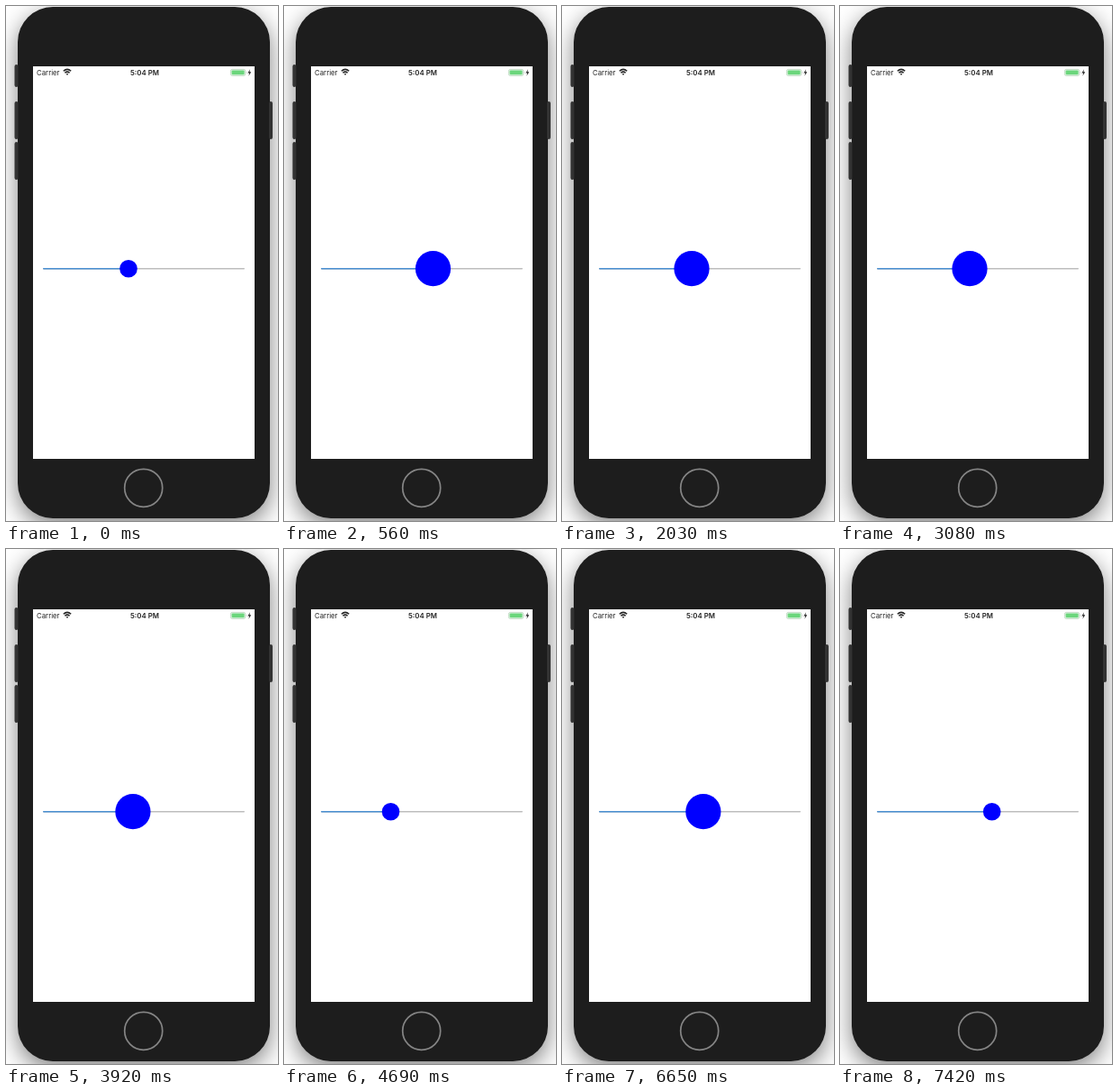
Recreate the animation shown at these times as an HTML page. Size 302 px wide and 572 px high, loop 7.7 s.

```html
<!DOCTYPE html>
<html lang="en">
<head>
<meta charset="utf-8">
<title>Slider thumb</title>
<style>
  html, body { margin: 0; width: 100%; height: 100%; overflow: hidden; background: #fff; }
  svg { display: block; width: 302px; height: 572px; }
  text { font-family: Inter, "Liberation Sans", sans-serif; fill: #222; }
  .soft { filter: blur(.4px); }
  .body { fill: #1d1d1d; filter: drop-shadow(0 8px 13px rgba(0, 0, 0, .5)); }
</style>
</head>
<body>
<svg viewBox="0 0 302 572">
  <g class="soft">
    <rect class="body" x="13" y="1" width="280" height="568" rx="39"/>
    <path d="M11.5 67v21M11.5 108v38M11.5 153v38M294 108v38" stroke="#333" stroke-width="4" stroke-linecap="round"/>
    <circle cx="152.7" cy="535.3" r="21" fill="none" stroke="#858585" stroke-width="1.7"/>
    <rect x="30" y="67" width="246" height="436" fill="#fff"/>
    <rect x="41" y="291" width="224" height="1.6" rx=".8" fill="#bdbdbd"/>
    <rect id="fill" x="41" y="291" height="1.6" rx=".8" fill="#4a90d2"/>
    <circle id="thumb" cy="291.7" fill="#00f"/>
  </g>
  <text x="34" y="76.5" font-size="7.8">Carrier</text>
  <text x="154" y="76.5" font-size="7.8" font-weight="600" text-anchor="middle">5:04 PM</text>
  <path d="M63.8 72.2q4.2-3.6 8.4 0M65.4 74.2q2.6-2.2 5.2 0M67.2 75.8h1.6" fill="none" stroke="#222" stroke-width="1.5"/>
  <rect x="249.4" y="70.4" width="16.4" height="7" rx="1.8" fill="#e6f5e8" stroke="#b9d6bd" stroke-width=".8"/>
  <rect x="250.6" y="71.6" width="14" height="4.6" rx="1" fill="#6bd67c"/>
  <path d="M266.8 72.8v2.4q1.2-1.2 0-2.4" fill="#aaa"/>
  <path d="M271 70.2l-2.6 4.2h1.8l-.8 3.3 2.8-4.4h-1.8z" fill="#222"/>
</svg>
<script>
const LOOP = 7700, STEP = 70, SMALL = 9.8, LARGE = 19.6, START = 136;

// Each drag glides the thumb from where it rests to a new centre.
const drags = [
  { from: 70, to: 560, x: 165.5 },
  { from: 840, to: 1330, x: 218 },
  { from: 1470, to: 1890, x: 144 },
  { from: 3850, to: 4270, x: 118.5 },
  { from: 5670, to: 6160, x: 142 },
  { from: 6230, to: 7000, x: 168.7 }
];
const touches = [[70, 770], [910, 2310], [3080, 4690], [5250, 7070]];

const clamp = v => Math.min(1, Math.max(0, v));
const ease = p => (p + p * p * (3 - 2 * p)) / 2;
const thumbX = t => drags.reduce(
  (x, d) => x + (d.x - x) * ease(clamp((t - d.from) / (d.to - d.from))), START);
const radius = t => touches.some(([down, up]) => t >= down && t < up) ? LARGE : SMALL;

const thumb = document.getElementById("thumb");
const fill = document.getElementById("fill");

function draw() {
  const t = Math.floor(performance.now() % LOOP / STEP) * STEP, x = thumbX(t);
  thumb.setAttribute("cx", x);
  thumb.setAttribute("r", radius(t));
  fill.setAttribute("width", x - 41);
  requestAnimationFrame(draw);
}
draw();
</script>
</body>
</html>
```
